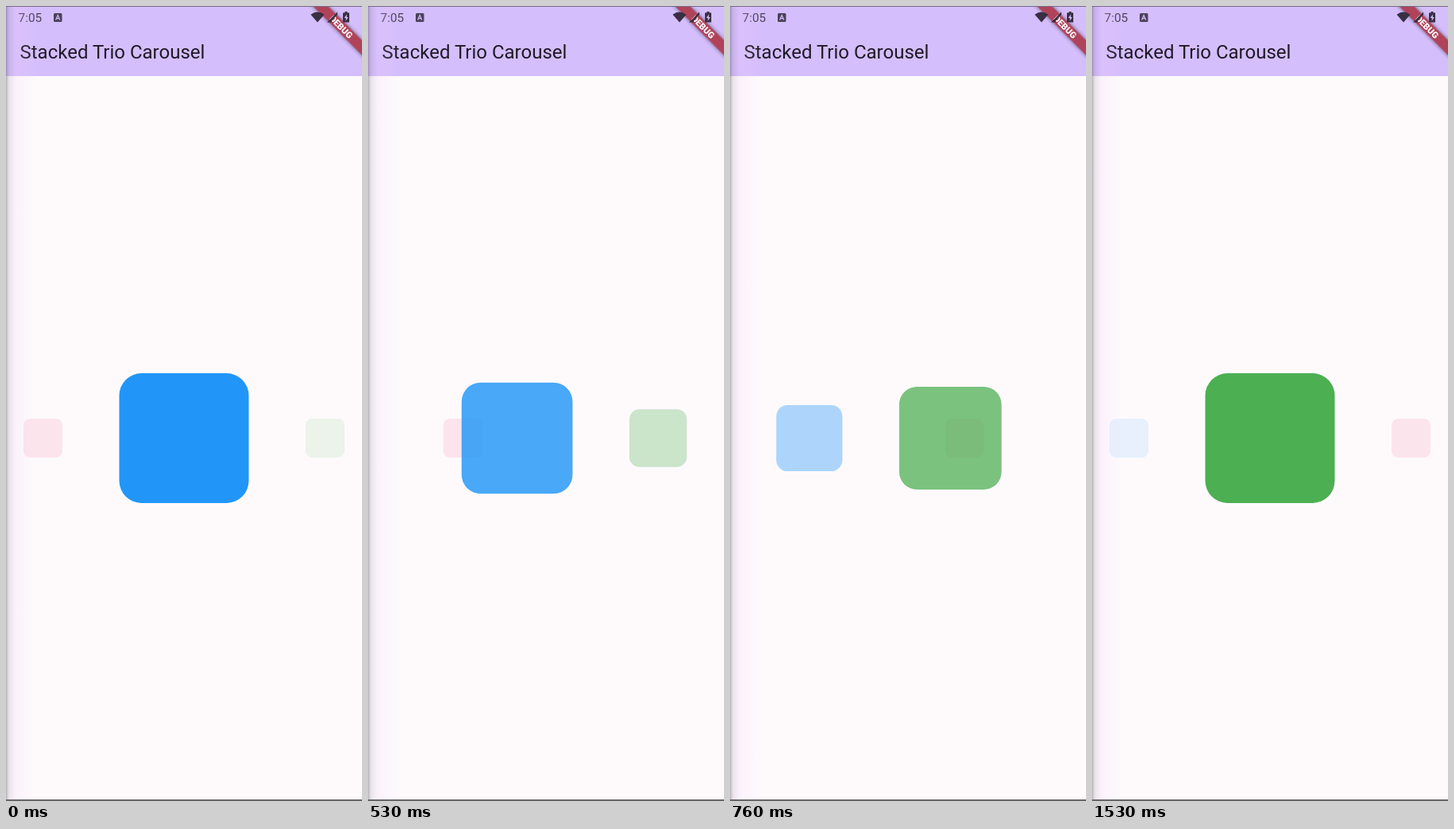
Animation of 448x998 px, one loop 1560 ms. Source, as an HTML page:

```html
<!DOCTYPE html>
<html lang="en">
<head>
<meta charset="utf-8">
<title>Stacked Trio Carousel</title>
<style>
  html, body { margin: 0; width: 100%; height: 100%; overflow: hidden; background: #fefafc; }
  svg { display: block; width: 448px; height: 998px; font-family: Roboto, sans-serif; }
  .banner { filter: drop-shadow(0 0 2.5px #0008); }
</style>
</head>
<body>
<svg viewBox="0 0 448 998">
  <defs>
    <linearGradient id="edge">
      <stop offset="0" stop-color="#555060" stop-opacity=".42"/>
      <stop offset=".1" stop-color="#8a7c96" stop-opacity=".17"/>
      <stop offset=".3" stop-color="#f0c8ff" stop-opacity=".18"/>
      <stop offset="1" stop-color="#f8e0ff" stop-opacity="0"/>
    </linearGradient>
    <rect id="card" x="-81.5" y="-81.5" width="163" height="163" rx="28"/>
  </defs>

  <rect width="448" height="998" fill="#fefafc"/>
  <rect width="448" height="88" fill="#d5befc"/>
  <text x="17.5" y="65.5" font-size="24" fill="#1f1a27">Stacked Trio Carousel</text>

  <use id="pink" href="#card" fill="#e91e63"/>
  <use id="blue" href="#card" fill="#2196f8"/>
  <use id="green" href="#card" fill="#4caf52"/>

  <g transform="translate(448 0) rotate(45)">
    <rect class="banner" x="-70" y="30.5" width="140" height="13.1" fill="#b0435a"/>
    <text y="41.1" font-size="11.1" font-weight="900" text-anchor="middle" fill="#fff">DEBUG</text>
  </g>

  <g fill="#4a4259">
    <text x="15.5" y="20" font-size="15.4">7:05</text>
    <rect x="60" y="9" width="10.5" height="11" rx="1.5"/>
    <path d="M62.6 17.5 65.2 11.5 67.8 17.5M63.6 15.6h3.2" fill="none" stroke="#d5befc" stroke-width="1.2"/>
  </g>
  <g fill="#382f42">
    <path d="M383.5 10.8Q392 4 400.5 10.8L392 20.5Z"/>
    <path d="M404 20.5 417 7.5V11L410 18V20.5Z"/>
    <path d="M426.5 7h3v1.5h2.5V20.5h-8V8.5h2.5Z"/>
    <path d="M428.8 10.5 425.7 15h2v3.7l3-4.7h-1.9Z" fill="#d5befc"/>
  </g>

  <rect width="40" height="998" fill="url(#edge)"/>
  <rect width="448" height="1" fill="#74698a"/>
  <rect y="996" width="448" height="2" fill="#68646a"/>
</svg>
<script>
  const LOOP = 1560, START = 311, DURATION = 600;
  const LEFT = 46.5, GAP = 177.5, MIN_SCALE = 49 / 163, MIN_OPACITY = 0.1;

  const bezier = (a, b, s) => 3 * a * s * (1 - s) ** 2 + 3 * b * s * s * (1 - s) + s ** 3;

  // cubic-bezier(.42, 0, .874, 1)
  function ease(x) {
    let low = 0, high = 1;
    for (let i = 0; i < 24; i++) {
      const mid = (low + high) / 2;
      if (bezier(0.42, 0.874, mid) < x) low = mid; else high = mid;
    }
    return bezier(0, 1, high);
  }

  // slot runs from 0 (left) to 2 (right); focus is 1 for the front card
  function place(id, slot, focus) {
    const card = document.getElementById(id);
    const scale = MIN_SCALE + (1 - MIN_SCALE) * focus;
    card.setAttribute("transform", `translate(${LEFT + GAP * slot} 542.5) scale(${scale})`);
    card.setAttribute("opacity", MIN_OPACITY + (1 - MIN_OPACITY) * focus);
  }

  function draw(now) {
    const time = (now % LOOP - START) / DURATION;
    const p = time <= 0 ? 0 : time >= 1 ? 1 : ease(time);
    place("pink", 2 * p, 0);
    place("blue", 1 - p, 1 - p);
    place("green", 2 - p, p);
  }

  const begin = performance.now();
  function tick() {
    draw(performance.now() - begin);
    requestAnimationFrame(tick);
  }
  tick();
</script>
</body>
</html>
```
